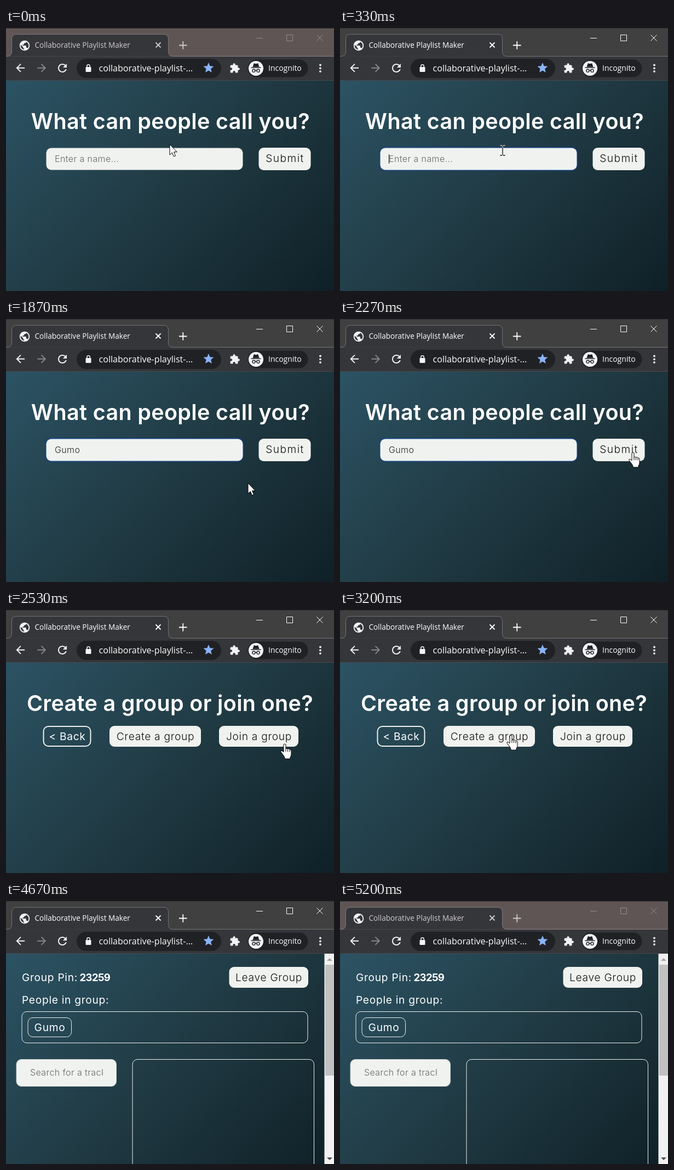
Write an HTML page that moves like this. It is 599 px wide and 479 px high and loops after 5340 ms.

```html
<!DOCTYPE html>
<html lang="en">
<head>
<meta charset="utf-8">
<title>Group sign-in</title>
<style>
html, body { margin: 0; width: 100%; height: 100%; overflow: hidden; background: #203a43; }
svg { display: block; width: 599px; height: 479px; }
text { font: 400 19.2px Inter, sans-serif; font-optical-sizing: none; letter-spacing: .7px; fill: #fff; white-space: pre; }
.ui text { font-family: "Open Sans", "Noto Sans", sans-serif; letter-spacing: 0; }
.ui .url { font-size: 16.1px; }
.ui .badge { font-size: 14px; }
.ui .title { font-size: 13.6px; }
.mid { text-anchor: middle; }
.head { font-size: 39.5px; font-weight: 580; letter-spacing: .35px; }
.btn { fill: #f0f2ef; }
.dark { fill: #111; font-weight: 350; }
.submit { letter-spacing: 1.4px; }
.field { font-size: 16px; letter-spacing: .4px; fill: #222; font-weight: 350; }
.hint { font-weight: 300; fill: #666; }
.pin { font-size: 18.5px; font-weight: 700; letter-spacing: -.6px; }
.box { fill: none; stroke: #eef1ee; }
.line { fill: none; stroke: #f1f3f4; }
.icon { fill: #f1f3f4; }
#ring { fill: none; stroke: #19498f; stroke-width: 2; filter: drop-shadow(0 0 1.5px #123f80); }
.beam { mix-blend-mode: difference; }
</style>
</head>
<body>
<svg viewBox="0 0 599 479">
  <defs>
    <linearGradient id="sky" gradientUnits="userSpaceOnUse" x1="54" y1="42" x2="545" y2="533">
      <stop stop-color="#2c5364"/><stop offset=".5" stop-color="#203a43"/><stop offset="1" stop-color="#0f2027"/>
    </linearGradient>
    <clipPath id="trackClip"><path d="M40 290h137v46H40z"/></clipPath>
    <path id="arrow" d="M0 0V19L4.4 15L7.3 22L10.5 20.7L7.6 13.8H13.2Z" fill="#fff" stroke="#000"/>
    <path id="beam" d="M-4.5 -9H-1M1 -9H4.5M0 -8.5V8.5M-4.5 9H-1M1 9H4.5" fill="none" stroke="#fff" stroke-width="1.3"/>
    <g id="hand" stroke="#000">
      <path fill="#fff" d="M-2 2a2 2 0 0 1 4 0V9q1.5 -1.5 3.5 0q2 -1 3.5 1q2.5 -.5 3 2v7q0 3 -2 5v3h-10v-2q-1 -3 -4 -6.5l-3 -4q-.8 -2.5 1.7 -2.3l3.3 2.5z"/>
      <path fill="none" d="M2 9v5M5.5 9.5v4.5M9 10.5v4"/>
    </g>
  </defs>

  <rect y="96" width="599" height="383" fill="url(#sky)"/>

  <g id="namePage">
    <text class="head mid" x="300.5" y="184">What can people call you?</text>
    <rect id="ring" x="73.5" y="218.5" width="359" height="40" rx="9"/>
    <rect class="btn" x="73.5" y="218.5" width="359" height="40" rx="9"/>
    <text id="hint" class="field hint" x="89" y="244">Enter a name...</text>
    <text id="typed" class="field" x="89" y="244"></text>
    <path id="caret" d="M.5 230v17" stroke="#111"/>
    <rect class="btn" x="461.5" y="218" width="95" height="41" rx="9"/>
    <text class="dark mid submit" x="509.5" y="244">Submit</text>
  </g>

  <g id="choicePage">
    <text class="head mid" x="299.5" y="184">Create a group or join one?</text>
    <rect class="box" x="68.5" y="212" width="86" height="36" rx="9" stroke-width="2"/>
    <text class="mid" x="112" y="237">&lt; Back</text>
    <rect class="btn" x="189" y="211" width="167" height="38" rx="9"/>
    <text class="dark mid" x="273" y="237">Create a group</text>
    <rect class="btn" x="389" y="211" width="145" height="38" rx="9"/>
    <text class="dark mid" x="462" y="237">Join a group</text>
  </g>

  <g id="groupPage">
    <text x="29" y="146">Group Pin:</text>
    <text class="pin" x="134.5" y="146">23259</text>
    <rect class="btn" x="407.5" y="120" width="144.5" height="38" rx="9"/>
    <text class="dark mid" x="480" y="146">Leave Group</text>
    <text x="29" y="187">People in group:</text>
    <rect class="box" x="29" y="201.5" width="522" height="57" rx="9"/>
    <g id="member">
      <rect class="box" x="40" y="212.5" width="79.5" height="35" rx="9"/>
      <text class="mid" x="80" y="237">Gumo</text>
    </g>
    <rect class="btn" x="19" y="288.5" width="182.5" height="49" rx="9" stroke="#c9cfcd"/>
    <text class="field hint" x="44" y="318" clip-path="url(#trackClip)">Search for a track</text>
    <rect class="box" x="231" y="288.5" width="331.5" height="220" rx="9"/>
    <rect x="581.5" y="96" width="18" height="383" fill="#f1f1f1"/>
    <rect x="583" y="116" width="16" height="202" fill="#c1c1c1"/>
    <path d="M586 109l5 -5 5 5z" fill="#a3a3a3"/>
    <path d="M586 467l5 5 5 -5z" fill="#505050"/>
  </g>

  <g class="ui">
    <rect id="strip" width="599" height="52"/>
    <rect width="599" height="1" fill="#333"/>
    <rect y="52" width="599" height="44" fill="#35363a"/>
    <rect y="95" width="599" height="1" fill="#47484c"/>
    <path d="M0 51.5H2Q10.5 51.5 10.5 43V20Q10.5 11.5 19 11.5H288Q296.500 11.5 296.5 20V43Q296.5 51.5 305 51.5H599" fill="#35363a" stroke="#fff" stroke-opacity=".28"/>
    <path d="M3 52h301v2H3z" fill="#35363a"/>
    <path class="icon" transform="translate(23 21) scale(.92)" d="M12 2C6.48 2 2 6.48 2 12s4.48 10 10 10 10-4.48 10-10S17.52 2 12 2zm-1 17.93c-3.95-.49-7-3.85-7-7.93 0-.62.08-1.21.21-1.79L9 15v1c0 1.1.9 2 2 2v1.93zm6.9-2.54c-.26-.81-1-1.39-1.9-1.39h-1v-3c0-.55-.45-1-1-1H8v-2h2c.55 0 1-.45 1-1V7h2c1.1 0 2-.9 2-2v-.41c2.93 1.19 5 4.06 5 7.41 0 2.08-.8 3.97-2.1 5.39z"/>
    <g id="tabInk">
      <text class="title" x="52.5" y="36" style="fill:inherit">Collaborative Playlist Maker</text>
      <path d="M273.5 26.5l9 9m0 -9l-9 9M316 31.5h14.5M323.25 24.25v14.5" fill="none" stroke-width="1.8"/>
    </g>
    <path id="winInk" d="M457 18.5h12M512.5 12.5h11v11h-11zM567.5 12.5l11 11m0 -11l-11 11" fill="none"/>

    <path class="icon" transform="translate(14.5 61) scale(.98)" d="M20 11H7.83l5.59-5.59L12 4l-8 8 8 8 1.41-1.41L7.83 13H20z"/>
    <path fill="#85878a" transform="translate(77 61) scale(-.98 .98)" d="M20 11H7.83l5.59-5.59L12 4l-8 8 8 8 1.41-1.41L7.83 13H20z"/>
    <path class="icon" transform="translate(91 61)" d="M17.65 6.35C16.2 4.9 14.21 4 12 4c-4.42 0-7.99 3.58-7.99 8s3.57 8 7.99 8c3.73 0 6.84-2.55 7.73-6h-2.08c-.82 2.33-3.04 4-5.65 4-3.31 0-6-2.69-6-6s2.69-6 6-6c1.66 0 3.14.69 4.22 1.78L13 11h7V4z"/>
    <rect x="129" y="56" width="264" height="35" rx="17.5" fill="#202124"/>
    <rect class="icon" x="145.5" y="71" width="10" height="9" rx="1.3"/>
    <path class="line" d="M147.8 71v-1.5a2.7 2.7 0 0 1 5.4 0v1.5" stroke-width="1.5"/>
    <text class="url" x="169.5" y="79">collaborative-playlist-...</text>
    <path fill="#8ab4f8" transform="translate(358.5 61) scale(.95)" d="M12 17.27L18.18 21l-1.64-7.03L22 9.24l-7.19-.61L12 2 9.19 8.63 2 9.24l5.46 4.73L5.82 21z"/>
    <path class="icon" transform="translate(408 63.5) scale(.82)" d="M20.5 11H19V7c0-1.1-.9-2-2-2h-4V3.5C13 2.12 11.88 1 10.5 1S8 2.12 8 3.5V5H4c-1.1 0-1.99.9-1.99 2v3.8H3.5c1.49 0 2.7 1.21 2.7 2.7s-1.21 2.7-2.7 2.7H2V20c0 1.1.9 2 2 2h3.8v-1.5c0-1.49 1.21-2.7 2.7-2.7 1.49 0 2.7 1.21 2.7 2.7V22H17c1.1 0 2-.9 2-2v-4h1.5c1.38 0 2.5-1.12 2.5-2.5S21.88 11 20.5 11z"/>
    <rect x="441.5" y="57.5" width="110" height="32" rx="16" fill="#202124"/>
    <circle class="icon" cx="456.5" cy="73.5" r="13.5"/>
    <path d="M450.5 71l2 -6q.5 -1 1.5 -.6l2.5 .8 2.5 -.8q1 -.4 1.5 .6l2 6z" fill="#202124"/>
    <g fill="none" stroke="#202124" stroke-width="1.4">
      <path d="M447.5 72.3h18M455 77.5q1.5 -1 3 0"/>
      <circle cx="452.5" cy="77.8" r="2.6"/><circle cx="460.5" cy="77.8" r="2.6"/>
    </g>
    <text class="badge" x="479" y="78">Incognito</text>
    <g class="icon"><circle cx="574" cy="67.5" r="1.9"/><circle cx="574" cy="73.3" r="1.9"/><circle cx="574" cy="79.1" r="1.9"/></g>
  </g>

  <use id="cursor"/>
</svg>
<script>
const LOOP = 5340, TICK = 1000 / 15, NAME = 'Gumo';
const $ = id => document.getElementById(id);
const show = (id, on) => { $(id).style.display = on ? '' : 'none'; };
const within = (n, a, b) => n >= a && n < b;

// All times below are in ticks of 1/15 s.
const keystrokes = [15, 17, 19, 20];
const pages = [['namePage', 0], ['choicePage', 37], ['groupPage', 51]];
const pointerEnd = 70;

// tick, x, y
const track = [
  [0, 299, 212], [1, 298, 224], [2, 297, 223], [24, 297, 223],
  [25, 305, 230], [27, 385, 285], [29, 498, 312], [30, 545, 300],
  [31, 563, 277], [32, 556, 257], [33, 541, 247], [34, 535, 243],
  [36, 535, 243], [38, 509, 244], [42, 370, 244], [43, 345, 238],
  [45, 327, 229], [46, 319, 229], [48, 312, 228], [50, 312, 228],
  [51, 309, 228], [54, 309, 228], [56, 308, 232], [66, 308, 232],
  [67, 297, 268], [69, 219, 384], [70, 219, 384]
];

// page, pointer shape, left, top, right, bottom
const hotspots = [
  [0, 'beam', 73, 218, 433, 259], [0, 'hand', 461, 218, 557, 259],
  [1, 'hand', 189, 211, 356, 249], [1, 'hand', 389, 211, 534, 249]
];

function pointerAt(n) {
  const i = Math.max(1, track.findIndex(k => k[0] >= n));
  const [t0, x0, y0] = track[i - 1], [t1, x1, y1] = track[i];
  const p = (n - t0) / (t1 - t0);
  return [Math.round(x0 + (x1 - x0) * p), Math.round(y0 + (y1 - y0) * p)];
}

function shapeAt(page, x, y) {
  const hit = hotspots.find(([p, , l, t, r, b]) => p === page && x >= l && x <= r && y >= t && y <= b);
  return hit ? hit[1] : 'arrow';
}

function drawWindow(n) {
  const active = within(n, 4, 78);
  $('strip').setAttribute('fill', active ? '#404040' : '#605555');
  const ink = active ? '#fff' : '#cfcbcb';
  $('tabInk').style.fill = ink;
  $('tabInk').lastElementChild.style.stroke = ink;
  $('winInk').style.stroke = active ? '#fff' : '#958b8b';
}

function drawField(n) {
  const count = keystrokes.filter(k => n >= k).length;
  $('typed').textContent = NAME.slice(0, count);
  show('hint', !count);
  show('ring', within(n, 4, 35));
  $('ring').style.opacity = n < 5 ? .5 : 1;
  show('caret', within(n, 4, 12) || within(n, 15, 28));
  const end = count ? $('typed').getComputedTextLength() : 0;
  $('caret').setAttribute('transform', `translate(${Math.round(89 + end)} 0)`);
}

function drawPointer(n, page) {
  show('cursor', n < pointerEnd);
  if (n >= pointerEnd) return;
  const [x, y] = pointerAt(n), shape = shapeAt(page, x, y);
  $('cursor').setAttribute('href', '#' + shape);
  $('cursor').setAttribute('class', shape);
  $('cursor').setAttribute('transform', `translate(${x} ${y})`);
}

let last = -1;
function frame(now) {
  const n = Math.floor((now % LOOP + 3.4) / TICK) % 80;
  if (n !== last) {
    last = n;
    const page = pages.filter(p => n >= p[1]).length - 1;
    pages.forEach(([id], i) => show(id, i === page));
    show('member', n >= 53);
    drawWindow(n);
    if (page === 0) drawField(n);
    drawPointer(n, page);
  }
  requestAnimationFrame(t => frame(Math.max(0, t - start)));
}
const start = performance.now();
frame(0);
</script>
</body>
</html>
```
